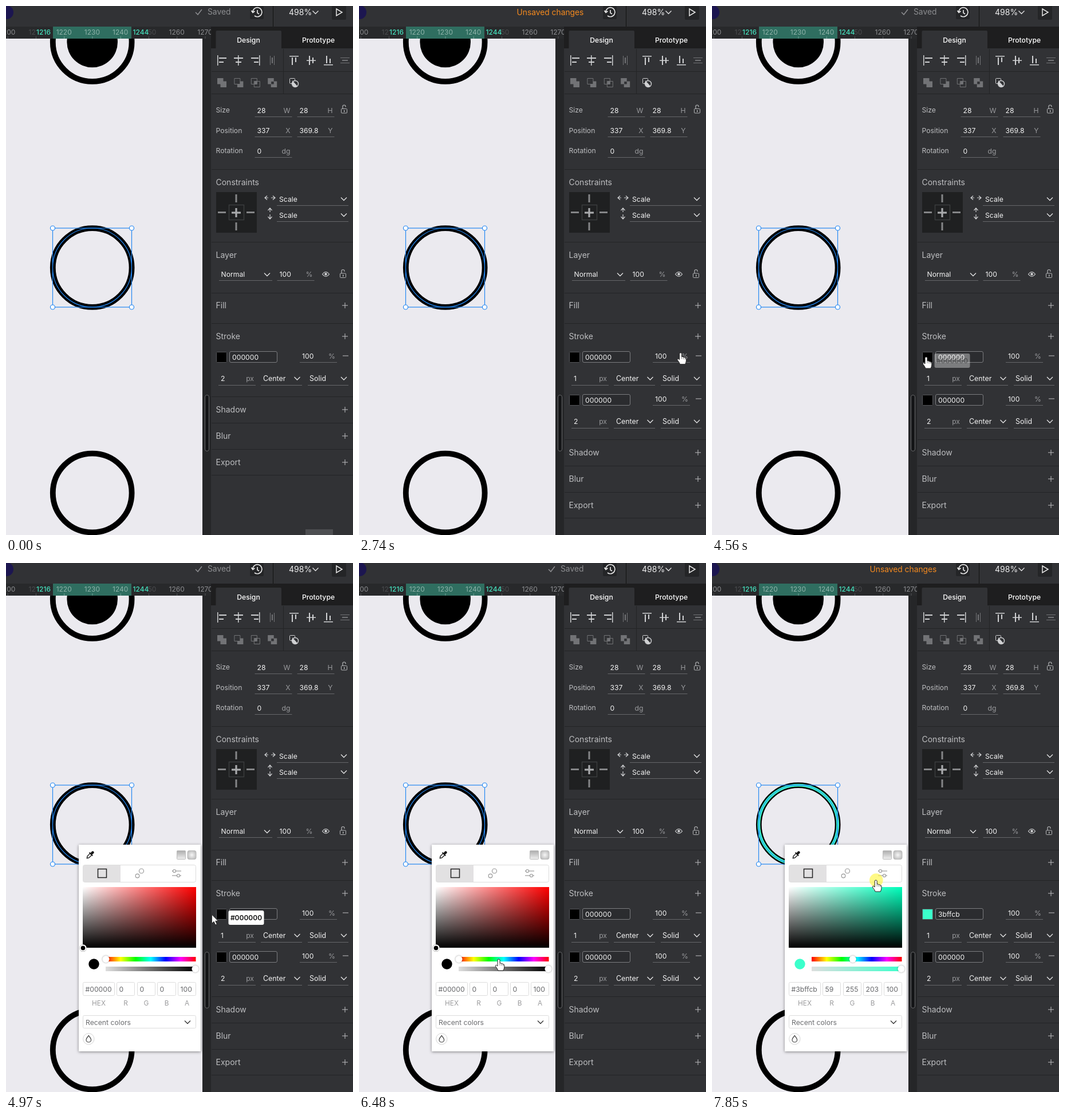
These frames come from a looping animation (606 by 924 pixels, 8 s). An HTML page with a canvas:

```html
<!DOCTYPE html>
<html lang="en">
<head>
<meta charset="utf-8">
<title>Stroke colour</title>
<style>
html, body { margin: 0; width: 100%; height: 100%; overflow: hidden; background: #313235; }
canvas { display: block; width: 606px; height: 924px; }
</style>
</head>
<body>
<canvas id="stage"></canvas>
<script>
const W = 606, H = 924, LOOP = 8000;
const canvas = document.getElementById('stage');
const dpr = window.devicePixelRatio || 1;
canvas.width = W * dpr;
canvas.height = H * dpr;
const c = canvas.getContext('2d');
const PANEL = '#313235', DARK = '#222325', LINE = '#232426', RULE = '#66676a';
const LABEL = '#bdbec0', VALUE = '#f3f3f3', UNIT = '#98999c', ICON = '#d0d1d3', DIM = '#727376';
const HUE = 164.08;

// drawing helpers
function box(x, y, w, h, color) { c.fillStyle = color; c.fillRect(x, y, w, h); }
function frame(x, y, w, h, r, fill, stroke) {
  c.beginPath();
  c.roundRect(x, y, w, h, r);
  if (fill) { c.fillStyle = fill; c.fill(); }
  if (stroke) { c.lineWidth = 1; c.strokeStyle = stroke; c.stroke(); }
}
function disc(x, y, r, fill, stroke, lw = 1) {
  c.beginPath();
  c.arc(x, y, r, 0, Math.PI * 2);
  if (fill) { c.fillStyle = fill; c.fill(); }
  if (stroke) { c.lineWidth = lw; c.strokeStyle = stroke; c.stroke(); }
}
function line(color, lw, ...pts) {
  c.beginPath();
  for (let i = 0; i < pts.length; i += 2) c.lineTo(pts[i], pts[i + 1]);
  c.strokeStyle = color;
  c.lineWidth = lw;
  c.stroke();
}
function text(s, x, y, color, size = 12.2, weight = 400, align = 'left') {
  c.font = `${weight} ${size}px Inter, "Open Sans", sans-serif`;
  c.textAlign = align;
  c.fillStyle = color;
  c.fillText(s, x, y);
}
function path(d, fill, stroke, lw = 1.2) {
  const p = new Path2D(d);
  if (fill) { c.fillStyle = fill; c.fill(p); }
  if (stroke) { c.lineWidth = lw; c.strokeStyle = stroke; c.stroke(p); }
}
function at(x, y, draw) { c.save(); c.translate(x, y); draw(); c.restore(); }
function blend(stops, x0, y0, x1, y1) {
  const g = c.createLinearGradient(x0, y0, x1, y1);
  stops.forEach((s, i) => g.addColorStop(i / (stops.length - 1), s));
  return g;
}
const rule = (x0, x1, y, color = RULE) => box(x0, y, x1 - x0, 1, color);
const chevron = (x, y, color = '#e4e4e5') => line(color, 1.3, x - 5, y - 2.5, x, y + 2.5, x + 5, y - 2.5);
const plus = (x, y, color = '#b4b5b7') => {
  line(color, 1.1, x - 5, y, x + 5, y);
  line(color, 1.1, x, y - 5, x, y + 5);
};
const clamp = (v, a = 0, b = 1) => Math.min(b, Math.max(a, v));

// pointer path: time, x, y of the tip
const PATH = [
  [1050, 612, 560], [1120, 603, 566], [1330, 588, 574], [1470, 591, 577], [2460, 591, 577],
  [2900, 545, 622], [3180, 500, 668], [3320, 458, 677], [3390, 421, 674], [3460, 387, 667],
  [3600, 381, 652], [3740, 380, 643], [3940, 380, 643], [4220, 374, 613], [4840, 374, 613],
  [4970, 360, 614], [5170, 252, 634], [5450, 212, 682], [5700, 232, 696], [5940, 250, 694],
  [6070, 250, 694], [6480, 244, 692], [7060, 244, 692], [7500, 272, 596], [7780, 286.2, 554]
];
function tip(t) {
  const i = PATH.findIndex(k => k[0] > t);
  if (i === 0) return null;
  if (i < 0) return PATH[PATH.length - 1].slice(1);
  const [t0, x0, y0] = PATH[i - 1], [t1, x1, y1] = PATH[i];
  const f = (t - t0) / (t1 - t0);
  return [x0 + (x1 - x0) * f, y0 + (y1 - y0) * f];
}

// colour picked by dragging in the square
function picked(t) {
  if (t < 7500) return { x: 134, y: 672, rgb: [0, 0, 0] };
  const [px, py] = tip(t);
  const x = clamp(px, 134, 332), y = clamp(py, 566, 672);
  const s = (x - 134) / 198, v = 255 * (1 - (y - 566) / 106);
  const mid = 1 - s * (1 - (HUE / 60 - 2));
  return { x, y, rgb: [v * (1 - s), v, v * mid].map(Math.round) };
}
const hex = rgb => rgb.map(n => n.toString(16).padStart(2, '0')).join('');

function artboard(color) {
  box(0, 57, 343, 867, '#ebeaef');
  c.save();
  c.beginPath();
  c.rect(0, 57, 343, 867);
  c.clip();
  for (const y of [63, 457, 850.5]) disc(150.7, y, 68.9, null, '#000', 9.8);
  disc(150.7, 63, 44.3, '#000');
  if (color !== '000000') disc(150.7, 457, 68.9, null, '#' + color, 4.9);
  c.restore();
  disc(150.5, 457, 69, null, '#2488f2', 1.2);
  c.strokeRect(81.5, 388, 138, 138);
  for (const x of [81.5, 219.5]) for (const y of [388, 526]) disc(x, y, 4, '#fff', '#2488f2', 1.2);
}

function ruler() {
  box(0, 36, 358, 21, '#28292b');
  box(82, 36, 137, 21, '#2f6e60');
  for (let n = 1200; n <= 1270; n += 10) {
    const x = 2.7 + (n - 1200) * 4.925;
    const inside = n > 1216 && n < 1244;
    const near = n === 1210 || n === 1250;
    text(n, x, 50, near ? '#4b4c4f' : inside ? '#8fb3aa' : '#8d8e91', 12, 400, 'center');
    box(x, 53, 1, 4, inside ? '#6fa396' : '#55565a');
  }
  box(53, 37, 26, 16, '#28292b');
  box(222, 37, 26, 16, '#28292b');
  text('1216', 65.5, 50, '#45e0bd', 12, 500, 'center');
  text('1244', 235.5, 50, '#45e0bd', 12, 500, 'center');
  box(343, 57, 15, 867, '#252628');
  frame(347.5, 679.5, 7, 98, 3.5, '#151618', '#68696b');
}

function topBar(t) {
  box(0, 0, W, 36, PANEL);
  disc(1, 11, 12, '#1c1650');
  const unsaved = t >= 2130 && t < 3000 || t >= 7500;
  if (unsaved) {
    text('Unsaved changes', 275.5, 16, '#f58a1f', 13.8);
  } else if (t >= 3000 && t < 3740) {
    text('Saving', 349, 15, '#8c8d90', 13.8);
    at(333.5, 11, () => {
      c.rotate((t - 3460) / 160);
      path('M-5 -1A5 5 0 0 1 4 -3M5 1A5 5 0 0 1 -4 3M5 -6L4.5 -2.5L1 -3M-5 6L-4.5 2.5L-1 3', null, '#8c8d90');
    });
  } else {
    text('Saved', 352, 15, '#8c8d90', 13.8);
    line('#8c8d90', 1.5, 331, 11, 335, 15, 342, 6);
  }
  frame(426, 0, 24, 23, 2, '#242527');
  at(438, 11, () => path('M-7 -1A8 8 0 1 1 -4 6M-9.5 -3L-7 .5L-3.5 -2M1 -4V1L4 3', null, '#e6e6e6', 1.7));
  box(466, 0, 1, 36, '#111');
  text('498%', 494, 16, '#ededee', 14);
  chevron(540.5, 11);
  frame(569, -2, 25, 26, 2, '#242527');
  path('M577 5L587 11L577 17Z', null, '#e6e6e6', 1.5);
}

function alignIcons() {
  const mark = (x, y, w, h, col = ICON) => box(x, y, w, h, col);
  mark(369, 86, 1.5, 18); mark(372, 90, 13, 2); mark(372, 97, 8, 2);
  mark(405, 86, 1.5, 18); mark(398, 90, 16, 2); mark(401, 97, 10, 2);
  mark(442, 86, 1.5, 18); mark(428, 90, 13, 2); mark(433, 97, 8, 2);
  mark(461, 87, 1, 16, DIM); mark(468, 87, 1, 16, DIM); mark(464, 90, 2, 10, DIM);
  mark(495, 87, 16, 1.5); mark(499, 90, 2, 13); mark(505, 90, 2, 8);
  mark(525, 94.5, 16, 1.5); mark(529, 87, 2, 16); mark(535, 90, 2, 10);
  mark(555, 102, 16, 1.5); mark(559, 87, 2, 13); mark(565, 92, 2, 8);
  mark(584, 90, 16, 1, DIM); mark(584, 99, 16, 1, DIM); mark(587, 94, 10, 2, DIM);
  for (let i = 0; i < 4; i++) {
    at(369 + i * 29.4, 126, () => {
      if (i === 0 || i === 3) box(0, 0, 10.5, 10.5, DIM);
      if (i === 0 || i === 3) box(5.5, 5.5, 10.5, 10.5, DIM);
      if (i === 3) box(6, 6, 4.5, 4.5, PANEL);
      if (i === 1) { box(5.5, 5.5, 10.5, 10.5, DIM); frame(.5, .5, 10, 10, 0, PANEL, DIM); }
      if (i === 2) {
        frame(.5, .5, 10, 10, 0, null, DIM);
        frame(5.5, 5.5, 10, 10, 0, null, DIM);
        box(6, 6, 4.5, 4.5, DIM);
      }
    });
  }
  frame(495.5, 126.5, 9, 9, 1, null, ICON);
  disc(505, 136, 5.5, PANEL, ICON, 1.4);
  path('M500 130L509 140A5.5 5.5 0 0 1 500 137Z', ICON);
}

function lock(x, y) {
  frame(x - 5, y, 10, 7.5, 1, null, '#b4b5b7');
  path(`M${x - 2.5} ${y}V${y - 4}A2.5 2.5 0 0 1 ${x + 2.5} ${y - 4}V${y - 3}`, null, '#b4b5b7');
  box(x - .5, y + 2.5, 1.5, 3, '#b4b5b7');
}

function field(value, unit, x, y) {
  text(value, x + 4, y, VALUE);
  text(unit, x + 62, y, UNIT, 12.2, 400, 'right');
  rule(x, x + 65, y + 6);
}

function strokeRow(y, color, width, hover) {
  frame(367.5, y + .5, 18, 18, 1, '#' + color, '#55565a');
  frame(390.5, y - .5, 83, 19, 2.5, '#2b2c2f', '#7c7d80');
  text(color, 395, y + 13.5, VALUE);
  field('100', '%', 513, y + 12);
  line('#b4b5b7', 1.1, 588, y + 7, 598, y + 7);
  text(width, 375, y + 51, VALUE);
  text('px', 433, y + 51, UNIT, 12.2, 400, 'right');
  rule(371, 436, y + 58, hover ? '#c8c9cb' : RULE);
  text('Center', 449, y + 51, VALUE, 12.4);
  text('Solid', 530, y + 51, VALUE, 12.4);
  chevron(508.5, y + 46.5);
  chevron(590, y + 46.5);
  rule(445, 517, y + 58);
  rule(527, 598, y + 58);
}

function panel(t, color) {
  box(358, 36, 248, 888, PANEL);
  box(358, 36, 248, 38, '#1e1e1f');
  frame(366.5, 43, 114.5, 32, [2, 2, 0, 0], PANEL);
  text('Design', 423.5, 63.5, '#fff', 12.2, 500, 'center');
  text('Prototype', 545.5, 63.5, '#fff', 12.2, 500, 'center');
  alignIcons();
  box(484, 75, 1, 78, LINE);
  const added = t >= 2130, dy = added ? 75 : 0;
  for (const y of [114, 153, 285, 412, 501, 554, 682 + dy, 728 + dy, 774 + dy, 819 + dy]) rule(359, W, y, LINE);

  text('Size', 366.5, 186, LABEL);
  text('Position', 366.5, 221.5, LABEL);
  text('Rotation', 366.5, 257, LABEL);
  field('28', 'W', 434.5, 187);
  field('28', 'H', 508.5, 187);
  field('337', 'X', 434.5, 222);
  field('369.8', 'Y', 508.5, 222);
  field('0', 'dg', 434.5, 258);
  lock(590.5, 179.5);

  const head = (s, y, add) => {
    text(s, 366.5, y + 5, LABEL, 14);
    if (add) plus(592, y);
  };
  head('Constraints', 307.5);
  box(367, 325, 71, 71, '#1f2021');
  c.strokeStyle = '#3b3c3e';
  c.lineWidth = 1.5;
  c.strokeRect(389.5, 347.5, 26, 26);
  for (const [x, y, w, h] of [[400.5, 329, 3, 14], [400.5, 378, 3, 14], [370, 359, 14, 3], [420, 359, 14, 3]])
    box(x, y, w, h, '#858688');
  line('#a9aaac', 3.2, 394, 361, 410, 361);
  line('#a9aaac', 3.2, 402, 353, 402, 369);
  path('M452 335H458M463 335H470M456 331.5L452 335L456 338.5M466 331.5L470 335L466 338.5', null, ICON);
  path('M461 353V360M461 364V372M457.5 357L461 353L464.5 357M457.5 368L461 372L464.5 368', null, ICON);
  for (const y of [337, 365]) {
    text('Scale', 477, y + 4.5, VALUE);
    chevron(590, y);
    rule(473, 598, y + 11);
  }

  head('Layer', 434.5);
  text('Normal', 375.5, 473, VALUE);
  chevron(456, 469);
  rule(372, 465, 479);
  field('100', '%', 473.5, 473);
  path('M552.5 468.5Q558.5 460.5 564.5 468.5Q558.5 476 552.5 468.5Z', null, ICON);
  disc(558.5, 468.3, 2.2, ICON);
  lock(588.5, 467);

  head('Fill', 523, true);
  head('Stroke', 577, true);
  if (added) {
    strokeRow(604, color, 1, t >= 3600 && t < 4010);
    strokeRow(679, '000000', 2);
  } else {
    strokeRow(604, '000000', 2);
  }
  head('Shadow', 705 + dy, true);
  head('Blur', 751 + dy, true);
  head('Export', 797 + dy, true);
  if (t < 70) box(523, 914, 48, 10, '#4d4e51');
}

function knob(x, y) {
  c.save();
  c.shadowColor = 'rgba(0,0,0,.4)';
  c.shadowBlur = 3;
  disc(x, y, 6, '#fff');
  c.restore();
}

function picker(t, pick) {
  const tint = `rgb(${pick.rgb})`, hueSet = t >= 7020;
  c.save();
  c.globalAlpha = clamp((t - 4630) / 140);
  c.save();
  c.shadowColor = 'rgba(0,0,0,.45)';
  c.shadowBlur = 5;
  c.shadowOffsetY = 1;
  box(127, 492, 213, 361, '#fff');
  c.restore();

  at(147, 510, () => {
    c.rotate(Math.PI / 4);
    frame(-2.2, -8.5, 4.4, 6, 2, '#111');
    box(-4, -3, 8, 2, '#111');
    path('M-2 -1V5L0 8L2 5V-1', null, '#111', 1.3);
  });
  frame(298.5, 502.5, 15, 15, 1, blend(['#aaa', '#eee'], 0, 502, 0, 517), '#bbb');
  const round = c.createRadialGradient(324.5, 510, 0, 324.5, 510, 9);
  round.addColorStop(0, '#f6f6f6');
  round.addColorStop(1, '#b9b9b9');
  frame(317, 502.5, 15, 15, 3, round, '#bbb');

  frame(134.5, 527.5, 197, 30, 3, '#fff', '#dcdcdc');
  frame(134.5, 527.5, 65.5, 30, [3, 0, 0, 3], '#e2e1e2');
  c.strokeStyle = '#222';
  c.lineWidth = 1.5;
  c.strokeRect(160.5, 534.5, 15, 15);
  disc(236.5, 538, 4, null, '#999', 1.2);
  disc(229.5, 546.5, 3.3, null, '#999', 1.2);
  for (const [y, x] of [[538, 294], [546, 301]]) {
    line('#999', 1.2, 290, y, 306, y);
    disc(x, y, 2.5, '#fff', '#999', 1.2);
  }

  box(134, 566, 198, 106, blend(['#fff', hueSet ? `hsl(${HUE} 100% 50%)` : '#f00'], 134, 0, 332, 0));
  box(134, 566, 198, 106, blend(['rgba(0,0,0,0)', '#000'], 0, 566, 0, 672));
  disc(pick.x + .5, pick.y + .5, 5, tint, '#777', 2.6);
  disc(pick.x + .5, pick.y + .5, 5, null, '#fff', 2);

  disc(153.5, 700.5, 9.2, tint);
  box(174, 688, 157.5, 8, blend(['#f00', '#ff0', '#0f0', '#0ff', '#00f', '#f0f', '#f00'], 174, 0, 331.5, 0));
  knob(hueSet ? 245.8 : 174.5, 692);
  box(174, 705, 157.5, 8, '#fff');
  for (let i = 0; i < 78; i++) box(174 + (i >> 1) * 4, 705 + ((i + (i >> 1)) % 2) * 4, 4, 4, '#dedede');
  box(174, 705, 157.5, 8, blend([`rgba(${pick.rgb},0)`, tint], 174, 0, 331.5, 0));
  knob(330.5, 709);

  const cells = [
    ['HEX', '#' + hex(pick.rgb), 134, 56], ['R', pick.rgb[0], 193, 32], ['G', pick.rgb[1], 229, 32],
    ['B', pick.rgb[2], 264, 33], ['A', 100, 300, 32]
  ];
  for (const [name, value, x, w] of cells) {
    frame(x + .5, 732.5, w - 1, 23, 2, '#fff', '#dcdcdc');
    c.save();
    c.beginPath();
    c.rect(x, 732, w - 6, 24);
    c.clip();
    text(value, x + 4.5, 748.5, '#66676a');
    c.restore();
    text(name, x + w / 2, 772.5, '#9b9b9d', 11.8, 400, 'center');
  }
  frame(134.5, 790.5, 197, 22, 2, '#fff', '#dcdcdc');
  text('Recent colors', 139, 806.5, '#6c6d70');
  chevron(317, 802, '#333');
  disc(144.3, 831.3, 9.7, '#fff', '#d5d5d5');
  path('M144.3 825.5Q140 830.5 140 833A4.3 4 0 0 0 148.6 833Q148.6 830.5 144.3 825.5Z', null, '#444');
  c.restore();
}

function tooltip(t) {
  const fade = t < 4560 ? (t - 4420) / 140 * .36 : .36 + (t - 4560) / 280;
  c.save();
  c.globalAlpha = clamp(fade);
  frame(388.5, 607, 62, 25, 3, '#fff');
  text('#000000', 419.5, 624, '#111', 12, 600, 'center');
  c.restore();
}

function pointer(t) {
  const p = tip(t);
  if (!p) return;
  const [x, y] = p;
  if (t >= 1930 && t < 2130) {
    disc(592, 577, 11.5, '#8cf552', '#4fe58c');
    plus(592, 577, '#a8741c');
  }
  if (t >= 7020 && t < 7090 || t >= 7500) disc(x + .6, y, 11.8, 'rgba(255,246,60,.62)');
  at(x, y, () => {
    c.lineJoin = 'round';
    if (t >= 4900 && t < 5170) {
      path('M0 0V15.5L3.6 12.2L6.2 18L8.8 16.8L6.3 11.2H11Z', '#fff', '#222', .9);
    } else {
      path('M-2 1.7Q-2 0 0 0Q2 0 2 1.7V7Q4 5.8 5 8Q7 7 7.8 9Q9.8 8.6 9.8 11V14Q9.5 17 8 20H-1Q-2.5 16 -5.6 12.5Q-6.2 10.4 -4.4 10.2L-2 12Z', '#fff', '#222', 1);
      path('M2 7V11M5 8V11.5M7.8 9V12', null, '#555', .7);
    }
  });
}

function draw(now) {
  const t = now % LOOP;
  const pick = picked(t);
  const shown = hex(picked(t < 7850 ? Math.min(t, 7700) : t).rgb);
  c.setTransform(dpr, 0, 0, dpr, 0, 0);
  artboard(hex(pick.rgb));
  ruler();
  topBar(t);
  panel(t, shown);
  if (t >= 4630) picker(t, pick);
  if (t >= 4420 && t < 5100) tooltip(t);
  pointer(t);
}

const start = performance.now();
function tick() {
  draw(performance.now() - start);
  requestAnimationFrame(tick);
}
tick();
</script>
</body>
</html>
```
